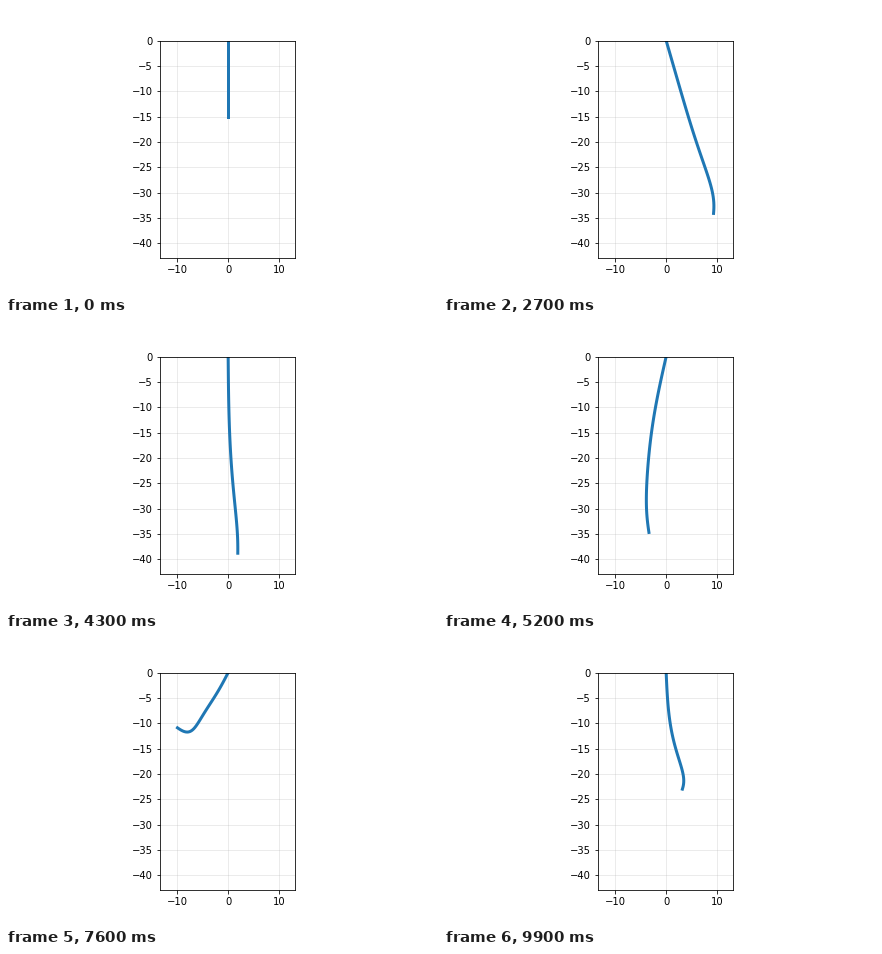
A matplotlib script that plays this animation: 432x288 px, repeating every 10000 ms.

```python
import matplotlib.pyplot as plt
import numpy as np
from matplotlib.animation import FuncAnimation

FRAMES, STEP = 100, 100  # count, ms

# time in s, free end x and y, sideways bow of the rope, hook near its end
KEYS = np.array([
    (0.0, 0, -15, 0, 0),
    (1.1, 8.1, -16.9, 0, .3),
    (2.1, 11.95, -27.1, .1, .6),
    (2.7, 9.35, -34.1, .15, .85),
    (3.3, 6.75, -37.9, 0, .7),
    (4.3, 1.9, -38.8, -.5, .3),
    (5.2, -3.4, -34.7, -1.4, -.4),
    (6.8, -12.15, -17.5, 2.45, .95),
    (7.6, -10, -10.9, 1.3, 1.8),
    (8.8, -3.9, -14.6, .2, 1.4),
    (9.9, 3.2, -23, -.7, .85),
])
TIMES, STATES = KEYS[:, 0], KEYS[:, 1:]
SLOPES = np.gradient(STATES, TIMES, axis=0)
S = np.linspace(0, 1, 61)  # position along the rope


def state(t):
    """Cubic Hermite motion through the key states."""
    i = min(np.searchsorted(TIMES, t, side="right") - 1, len(TIMES) - 2)
    h = TIMES[i + 1] - TIMES[i]
    u = (t - TIMES[i]) / h
    v = 1 - u
    return (STATES[i] * (1 + 2 * u) * v * v
            + STATES[i + 1] * u * u * (3 - 2 * u)
            + h * u * v * (SLOPES[i] * v - SLOPES[i + 1] * u))


def rope(t):
    x, y, bow, hook = state(t)
    tip = complex(x, y)
    curl = hook * np.sin(np.pi * S**4)
    side = bow * np.sin(np.pi * S) + curl
    return tip * S + tip / abs(tip) * (curl / 2 + 1j * side)


fig, ax = plt.subplots(figsize=(6, 4), dpi=72)
fig.subplots_adjust(left=0.125, right=0.9, bottom=0.125, top=0.88)
ax.set_aspect("equal")
ax.set_xlim(-13.5, 13.2)
ax.set_ylim(-42.9, 0)
ax.set_xticks([-10, 0, 10])
ax.set_yticks(range(-40, 1, 5))
ax.grid(alpha=0.3)
line, = ax.plot([], [], color="#1f77b4", lw=3)


def update(k):
    z = rope(k * STEP / 1000)
    line.set_data(z.real, z.imag)
    return line,


anim = FuncAnimation(fig, update, frames=FRAMES, interval=STEP, repeat=True,
                     repeat_delay=0)
plt.show()
```
